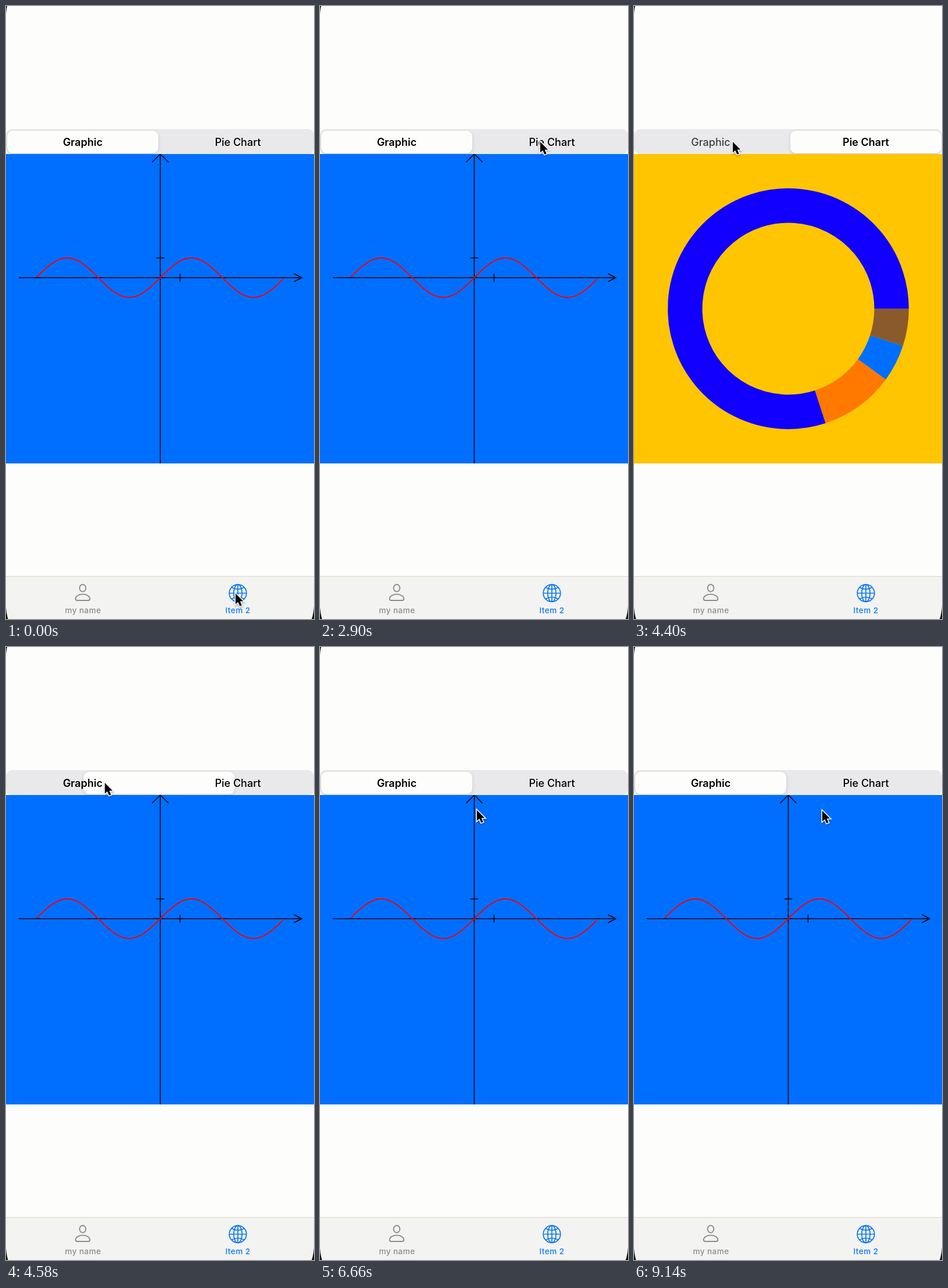
Write an HTML page with a canvas that moves like this. It is 530 px wide and 1056 px high and loops after 9.16 s.

```html
<!DOCTYPE html>
<html lang="en">
<head>
<meta charset="utf-8">
<style>
html, body { margin: 0; width: 100%; height: 100%; overflow: hidden; background: #fdfdfc; }
canvas { display: block; width: 530px; height: 1056px; }
</style>
</head>
<body>
<canvas id="stage" width="530" height="1056"></canvas>
<script>
const ctx = document.getElementById('stage').getContext('2d');
const LOOP = 9160;
const FONT = 'Inter, Roboto, sans-serif';
const BLUE = '#006fff';
const TO_PIE = 3110, TO_GRAPH = 4500;

// Pointer tip: time, x, y
const PATH = [
  [0, 395, 1012], [870, 395, 1012], [1800, 346, 185], [1900, 346, 185],
  [2080, 343, 182], [2600, 379, 234], [3830, 379, 234], [4340, 170, 234],
  [4870, 170, 234], [5340, 205, 256], [5440, 205, 256], [6640, 270, 281],
  [7530, 270, 281], [8390, 324, 282], [LOOP, 324, 282]
];

function pointerAt(t) {
  let i = 1;
  while (i < PATH.length - 1 && PATH[i][0] < t) i++;
  const [t0, x0, y0] = PATH[i - 1], [t1, x1, y1] = PATH[i];
  const p = (t - t0) / (t1 - t0);
  const k = 0.6 * p * p * (3 - 2 * p) + 0.4 * p;
  return [x0 + (x1 - x0) * k, y0 + (y1 - y0) * k];
}

function spring(ms) {
  if (ms <= 0) return 0;
  const w = ms * 0.021;
  return 1 - (1 + w) * Math.exp(-w);
}

function line(points, color, width) {
  ctx.beginPath();
  points.forEach(([x, y]) => ctx.lineTo(x, y));
  ctx.strokeStyle = color;
  ctx.lineWidth = width;
  ctx.stroke();
}

function rounded(x, y, w, h, r, color) {
  ctx.beginPath();
  ctx.roundRect(x, y, w, h, r);
  ctx.fillStyle = color;
  ctx.fill();
}

function label(text, x, y, size, weight, color, spacing = 0) {
  ctx.font = `${weight} ${size}px ${FONT}`;
  ctx.letterSpacing = spacing + 'px';
  ctx.textAlign = 'center';
  ctx.fillStyle = color;
  ctx.fillText(text, x, y);
}

function drawSegments(t, pie) {
  rounded(0, 212, 530, 43, 11, '#e9e9eb');
  const x = 2 + 267 * (spring(t - TO_PIE) - spring(t - TO_GRAPH));
  ctx.save();
  ctx.shadowColor = 'rgba(0,0,0,.14)';
  ctx.shadowBlur = 6;
  ctx.shadowOffsetY = 2;
  rounded(x, 215, 260, 38.5, 9.5, '#fdfdfc');
  ctx.restore();
  const pressed = up => t >= up - 115 && t < up ? '#404040' : '#000';
  label('Graphic', 132, 240.5, 18, pie ? 500 : 600, pressed(TO_GRAPH));
  label('Pie Chart', 399, 240.5, 18, pie ? 600 : 500, pressed(TO_PIE));
}

function drawGraph() {
  const cx = 265.5, cy = 468, unit = 34;
  ctx.fillStyle = BLUE;
  ctx.fillRect(0, 255, 530, 533);
  ctx.save();
  ctx.beginPath();
  ctx.rect(0, 255, 530, 533);
  ctx.clip();
  const axis = points => line(points, '#000', 1.5);
  axis([[cx, 255], [cx, 788]]);
  axis([[251.5, 269], [cx, 255], [279.5, 269]]);
  axis([[22, cy], [509, cy]]);
  axis([[495.5, 461], [509, cy], [495.5, 475]]);
  axis([[258.5, cy - unit], [272.5, cy - unit]]);
  axis([[cx + unit, 461], [cx + unit, 475]]);
  const wave = [];
  for (let x = 53; x <= 477; x += 2) wave.push([x, cy - unit * Math.sin((x - cx) / unit)]);
  line(wave, '#f0000f', 2);
  ctx.restore();
}

function drawPie() {
  ctx.fillStyle = '#fec500';
  ctx.fillRect(0, 255, 530, 533);
  const slices = [[0, 18, '#8b5a2b'], [18, 36, BLUE], [36, 72, '#ff7800'], [72, 360, '#1200ff']];
  for (const [from, to, color] of slices) {
    ctx.beginPath();
    ctx.arc(265.5, 521.5, 177.7, from * Math.PI / 180, to * Math.PI / 180);
    ctx.strokeStyle = color;
    ctx.lineWidth = 59.4;
    ctx.stroke();
  }
}

function drawTabs() {
  ctx.fillStyle = '#f3f3f1';
  ctx.fillRect(0, 982, 530, 74);
  ctx.fillStyle = '#dadabf';
  ctx.fillRect(0, 982, 530, 1);

  const gray = '#8c8c89', tint = '#0a76ee';
  ctx.lineWidth = 1.9;
  ctx.strokeStyle = gray;
  ctx.beginPath();
  ctx.ellipse(132, 1002.7, 5.4, 6.2, 0, 0, 7);
  ctx.stroke();
  ctx.stroke(new Path2D('M122.5 1024 Q119.7 1024 119.7 1021.3 C119.7 1017 125 1013.4 132 1013.4 S144.3 1017 144.3 1021.3 Q144.3 1024 141.5 1024 Z'));
  label('my name', 132.5, 1046, 13.6, 500, gray, 0.4);

  ctx.lineWidth = 1.7;
  ctx.strokeStyle = tint;
  for (const rx of [14.8, 7.2]) {
    ctx.beginPath();
    ctx.ellipse(399, 1011.5, rx, 14.8, 0, 0, 7);
    ctx.stroke();
  }
  ctx.stroke(new Path2D('M399 996.7V1026.3 M384.2 1011.5H413.8 M388 1001.5Q399 1008 410 1001.5 M388 1021.5Q399 1015 410 1021.5'));
  label('Item 2', 399, 1046, 13.6, 500, '#087aff', 0.4);
}

function drawCorners() {
  ctx.fillStyle = '#111';
  ctx.fill(new Path2D('M0 0H2Q.5 5 0 14Z M0 1036Q1 1048 3.5 1056H0Z M530 1034Q529 1048 526 1056H530Z'));
}

const ARROW = new Path2D('M0 0V18.5L4.3 14.7L7.4 21.8L10.8 20.4L7.7 13.4H13.4Z');
function drawPointer([x, y]) {
  ctx.save();
  ctx.translate(x, y);
  ctx.lineJoin = 'miter';
  ctx.lineWidth = 3;
  ctx.strokeStyle = '#fff';
  ctx.shadowColor = 'rgba(0,0,0,.35)';
  ctx.shadowBlur = 3;
  ctx.shadowOffsetY = 1.5;
  ctx.stroke(ARROW);
  ctx.shadowColor = 'transparent';
  ctx.fillStyle = '#000';
  ctx.fill(ARROW);
  ctx.restore();
}

function draw(now) {
  const t = now % LOOP;
  const pie = t >= TO_PIE && t < TO_GRAPH;
  ctx.fillStyle = '#fdfdfc';
  ctx.fillRect(0, 0, 530, 1056);
  drawSegments(t, pie);
  if (pie) drawPie(); else drawGraph();
  drawTabs();
  drawCorners();
  drawPointer(pointerAt(t));
}

const start = performance.now();
function tick() {
  draw(performance.now() - start);
  requestAnimationFrame(tick);
}
tick();
</script>
</body>
</html>
```
